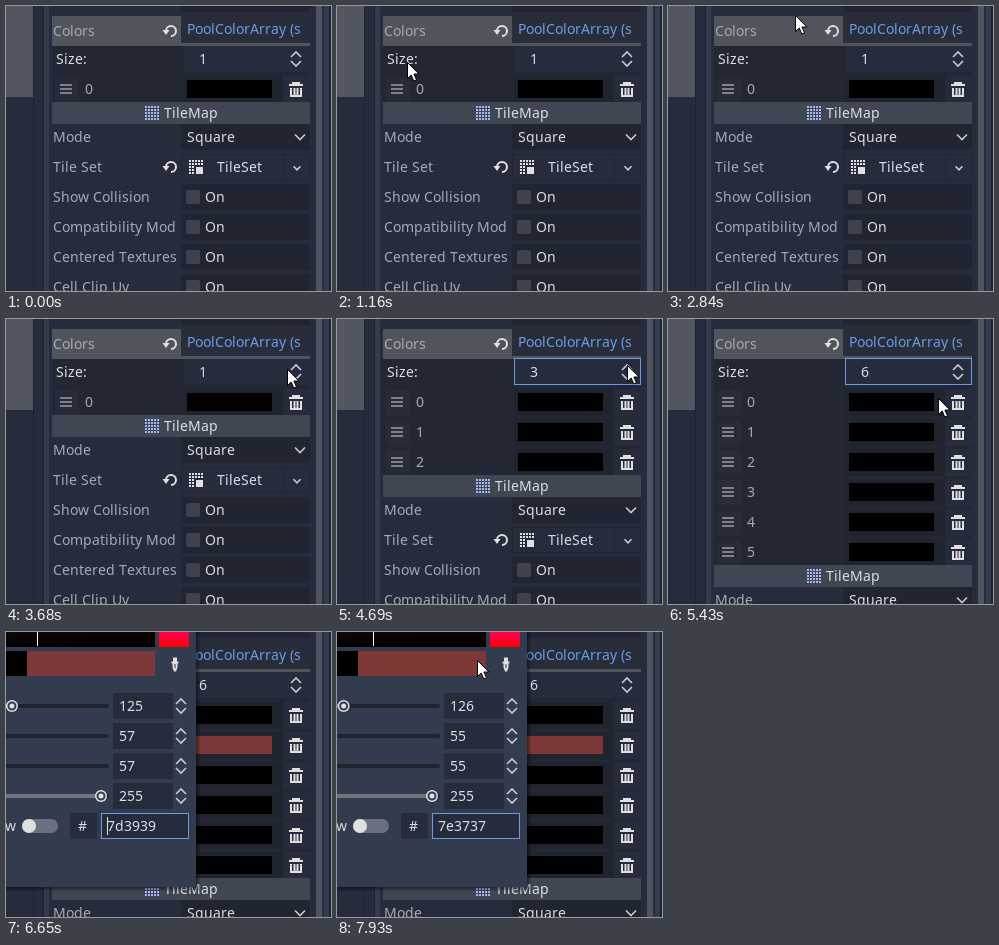
These frames come from a looping animation (325 by 285 pixels, 8 s). An HTML page:

```html
<!DOCTYPE html>
<html lang="en">
<head>
<meta charset="utf-8">
<title>Colour array inspector</title>
<style>
  html, body { margin: 0; width: 100%; height: 100%; overflow: hidden; background: #262c3b; }
  svg { display: block; width: 325px; height: 285px; }
  text { font: 14px "Noto Sans", sans-serif; fill: #dadce0; white-space: pre; }
  .dim { fill: #a6a9b1; }
  .link { fill: #699ce8; }
  .line { fill: none; stroke: #e0e0e0; stroke-width: 2; }
  .thin { fill: none; stroke: #c8cad0; stroke-width: 1.6; }
</style>
</head>
<body>
<svg id="stage" viewBox="0 0 325 285">
  <defs>
    <linearGradient id="sat" gradientUnits="userSpaceOnUse" x1="-107" x2="149">
      <stop stop-color="#fff"/><stop offset="1" stop-color="#f00"/>
    </linearGradient>
    <linearGradient id="val" x2="0" y2="1">
      <stop stop-opacity=".945"/><stop offset="1"/>
    </linearGradient>
    <linearGradient id="hue" x2="0" y2="1">
      <stop stop-color="#f05"/><stop offset="1" stop-color="#f00"/>
    </linearGradient>
    <clipPath id="labels"><rect x="46" y="0" width="124" height="300"/></clipPath>
  </defs>
</svg>
<script>
const LOOP = 8000, STEP = 70, ROW = 30;
const DARK = '#202531', BASE = '#333b4f', PANEL = '#262c3b', GROUP = '#222733';
const LIGHT = '#e0e0e0', ACCENT = '#699ce8';
const stage = document.getElementById('stage');
const pen = document.createElement('canvas').getContext('2d');
pen.font = '14px "Noto Sans", sans-serif';

function add(parent, tag, attrs) {
  const el = document.createElementNS('http://www.w3.org/2000/svg', tag);
  for (const key in attrs) el.setAttribute(key, attrs[key]);
  parent.append(el);
  return el;
}
const group = (parent, attrs) => add(parent, 'g', attrs);
const box = (parent, x, y, width, height, fill, more) =>
  add(parent, 'rect', { x, y, width, height, fill, ...more });
const path = (parent, d, cls, more) => add(parent, 'path', { d, class: cls, ...more });
const show = (el, on) => el.setAttribute('visibility', on ? 'visible' : 'hidden');
const frameRect = (parent, x, y, w, h, stroke = ACCENT, fill = 'none') =>
  box(parent, x + .5, y + .5, w - 1, h - 1, fill, { stroke });

// The interface font advances by whole pixels per glyph.
function write(el, x, text) {
  const xs = [...text].map(ch => {
    const at = x;
    x += Math.round(pen.measureText(ch).width);
    return at;
  });
  el.setAttribute('x', xs.join(' '));
  el.textContent = text;
}
function label(parent, x, y, text, cls = '') {
  const el = add(parent, 'text', { y, class: cls });
  write(el, x, text);
  return el;
}

function revert(parent, y) {
  path(parent, `M160 ${y}a5 5 0 1 1 5 5`, 'line');
  path(parent, `M156.500 ${y - 1}h7l-3.500 5z`, '', { fill: LIGHT });
}
function chevron(parent, x, y, half, dir = 1) {
  path(parent, `M${x - half} ${y - dir * half / 2}l${half} ${dir * half}l${half} ${-dir * half}`, 'thin');
}
function spinner(parent, x, y) {
  chevron(parent, x, y - 4.5, 5, -1);
  chevron(parent, x, y + 4.5, 5);
}
function dots(parent, x, y, fill, keep = () => true) {
  for (let i = 0; i < 5; i++)
    for (let j = 0; j < 5; j++)
      if (keep(i, j)) box(parent, x + 3 * i, y + 3 * j, 2, 2, fill);
}

// Surrounding panels
box(stage, 0, 0, 325, 285, PANEL);
box(stage, 0, 0, 27, 91, '#535761');
box(stage, 27, 0, 1, 285, '#1e2330');
box(stage, 37, 0, 1, 285, '#1e2330');
box(stage, 38, 0, 5, 285, BASE);
box(stage, 310, 0, 6, 285, '#50545f');
box(stage, 318, 0, 5, 285, BASE);
box(stage, 323, 0, 2, 285, '#1e2330');

// Array header and size
box(stage, 175, 0, 129, 6, DARK);
box(stage, 46, 10, 258, 30, '#50545d');
box(stage, 175, 8, 129, 29, '#282d39');
label(stage, 47, 30, 'Colors', 'dim');
label(stage, 181, 28, 'PoolColorArray (s', 'link');
revert(stage, 25);
box(stage, 46, 40, 258, 56, GROUP);
label(stage, 50, 58, 'Size:');
box(stage, 178, 40, 126, 26, PANEL);
const sizeText = label(stage, 193, 58, '1');
spinner(stage, 290, 53);
const sizeFocus = frameRect(stage, 177, 39, 127, 27);

// Array items
const items = Array.from({ length: 6 }, (_, i) => {
  const g = group(stage, { transform: `translate(0 ${ROW * i})` });
  box(g, 46, 68, 258, ROW, GROUP);
  box(g, 49, 71, 24, 25, '#262b37');
  path(g, 'M54 79h12m-12 4h12m-12 4h12', '', { stroke: '#7d8189', 'stroke-width': 2 });
  label(g, 79, 88, String(i), 'dim');
  box(g, 177, 70, 127, 27, '#1f242f');
  const swatch = box(g, 181, 74, 85, 18, '#000');
  box(g, 277, 70, 27, 27, PANEL);
  path(g, 'M283 79h14M287 79v-2h6v2M285 82v8h10v-8M288.500 82v7m3 0v-7', 'line', { 'stroke-width': 1.6 });
  return { g, swatch };
});

// Section below the array
const lower = group(stage);
box(lower, 43, 96, 265, 200, PANEL);
box(lower, 46, 96, 258, 22, '#414653');
dots(lower, 139, 100, '#a5b7f3');
label(lower, 158, 112, 'TileMap');
const names = group(lower, { 'clip-path': 'url(#labels)' });
['Mode', 'Tile Set', 'Show Collision', 'Compatibility Mod', 'Centered Textures', 'Cell Clip Uv']
  .forEach((name, i) => {
    const y = 131 + ROW * i;
    label(names, 47, y + 5, name, 'dim');
    box(lower, 175, y - 13, 129, 26, DARK);
    if (i > 1) {
      box(lower, 180, y - 7, 14, 14, '#3d424e', { rx: 2 });
      label(lower, 199, y + 5, 'On');
    }
  });
label(lower, 181, 136, 'Square');
chevron(lower, 294, 131, 5);
revert(lower, 161);
frameRect(lower, 175, 148, 103, 26, DARK, PANEL);
frameRect(lower, 277, 148, 27, 26, DARK, PANEL);
dots(lower, 183, 154, LIGHT, (i, j) => i < 2 || j < 2);
box(lower, 190, 161, 7, 7, LIGHT);
label(lower, 211, 166, 'TileSet');
chevron(lower, 291, 162, 3.5);

// Colour picker
const picker = group(stage);
for (const d of [4, 3, 2, 1]) box(picker, -5, -5, 195 + d, 260 + d, '#000', { opacity: .12 });
box(picker, -5, -5, 195, 260, BASE);
box(picker, 0, 0, 149, 15, 'url(#sat)');
box(picker, 0, 0, 149, 15, 'url(#val)');
const cross = box(picker, 0, 0, 1, 14, '#fff');
box(picker, 153, 0, 30, 15, 'url(#hue)');
box(picker, 0, 19, 149, 25, '#000');
const sample = box(picker, 21, 19, 128, 25, '#000');
path(picker, 'M167 25.500h4v4h1.500v2h-1v4l-1.500 4h-2l-1.500 -4v-4h-1v-2h1.500z', '', { fill: LIGHT });
path(picker, 'M169 32v4', '', { stroke: BASE });

const channels = Array.from({ length: 4 }, (_, i) => {
  const y = 74 + ROW * i;
  box(picker, -2, y - 2, 105, 4, '#1f2430', { rx: 2 });
  const fill = box(picker, -2, y - 2, 0, 4, '#70757f');
  const knob = group(picker);
  add(knob, 'circle', { cy: y, r: 6, fill: LIGHT });
  add(knob, 'circle', { cy: y, r: 3.5, fill: LIGHT, stroke: BASE, 'stroke-width': 2 });
  box(picker, 107, y - 13, 60, 26, PANEL);
  spinner(picker, 175, y);
  return { fill, knob, text: label(picker, 113, y + 5, '') };
});

label(picker, -1, 199, 'w');
box(picker, 16, 187, 36, 14, '#6a707d', { rx: 7 });
add(picker, 'circle', { cx: 23, cy: 194, r: 7, fill: LIGHT });
box(picker, 64, 181, 27, 26, PANEL);
label(picker, 72, 199, '#');
frameRect(picker, 95, 181, 88, 26, ACCENT, PANEL);
const hexText = label(picker, 101, 199, '');
const caret = box(picker, 101, 185, 1, 18, LIGHT);

const cursor = path(stage, 'M.5 .5v16l3.700 -3.500l2.600 6l2.700 -1.200l-2.600 -5.800h5z', '',
  { fill: '#fff', stroke: '#000', 'stroke-linejoin': 'round' });

const CLICK = 4010, HOLD = 4680, REPEAT = 75, OPEN = 5970;
const CIRCLE_IN = 1230, CIRCLE_OUT = 3443;

const sizeAt = t => t < CLICK ? 1 : t < HOLD ? 2 : Math.min(6, 3 + Math.floor((t - HOLD) / REPEAT));
const colorAt = t => t < 6650 ? [0, 0, 0] : t < 6720 ? [125, 57, 57] : [126, 55, 55];

// The pointer rings the header, clockwise from its left end.
function circle(t) {
  const a = (t - 1963) / 740 * 2 * Math.PI;
  return [167 - 100 * Math.cos(a), 55 - 50 * Math.sin(a)];
}

// Eased glides between stops: [time, x, y]
const glides = [
  [[460, 201, 232], [CIRCLE_IN, ...circle(CIRCLE_IN)]],
  [[CIRCLE_OUT, ...circle(CIRCLE_OUT)], [3680, 281, 50], [4010, 290, 46], [4900, 290, 46],
   [5430, 270, 79], [5900, 212, 112], [6180, 201, 108], [6390, 101, 65]],
  [[7390, 118, -14], [7880, 140, 28], [LOOP, 140, 28]]
];

function pointer(t) {
  if (t >= CIRCLE_IN && t < CIRCLE_OUT) return circle(t);
  for (const stops of glides) {
    const i = stops.findIndex((stop, k) => k && t >= stops[k - 1][0] && t < stop[0]);
    if (i < 0) continue;
    const [from, to] = [stops[i - 1], stops[i]];
    const u = (1 - Math.cos(Math.PI * (t - from[0]) / (to[0] - from[0]))) / 2;
    return [1, 2].map(k => from[k] + (to[k] - from[k]) * u);
  }
  return null;
}

function drawPicker(t) {
  picker.setAttribute('display', t >= OPEN ? 'inline' : 'none');
  const rgb = colorAt(t), [r, g] = rgb;
  const hex = rgb.map(v => v.toString(16).padStart(2, '0')).join('');
  cross.setAttribute('x', Math.round(149 - 258 * (r ? g / r : 1)));
  sample.setAttribute('fill', '#' + hex);
  items[1].swatch.setAttribute('fill', '#' + hex);
  write(hexText, 101, hex);
  [...rgb, 255].forEach((v, i) => {
    const x = 95 - (255 - v) * .685, { text, knob, fill } = channels[i];
    write(text, 113, String(v));
    knob.setAttribute('transform', `translate(${x} 0)`);
    fill.setAttribute('width', Math.max(0, x + 2));
  });
  show(caret, t >= 6450 && (t - 6450) % 940 < 470);
}

function draw(t) {
  const size = sizeAt(t);
  write(sizeText, 193, String(size));
  items.forEach(({ g }, i) => show(g, i < size));
  lower.setAttribute('transform', `translate(0 ${ROW * (size - 1)})`);
  show(sizeFocus, t >= CLICK && t < OPEN);
  drawPicker(t);

  // The pointer is sampled at a fixed rate.
  const at = pointer(t - (t + 30) % STEP);
  show(cursor, at);
  if (at) cursor.setAttribute('transform', `translate(${at.map(Math.round).join(' ')})`);
}

const start = performance.now();
function tick() {
  draw((performance.now() - start) % LOOP);
  requestAnimationFrame(tick);
}
tick();
</script>
</body>
</html>
```
